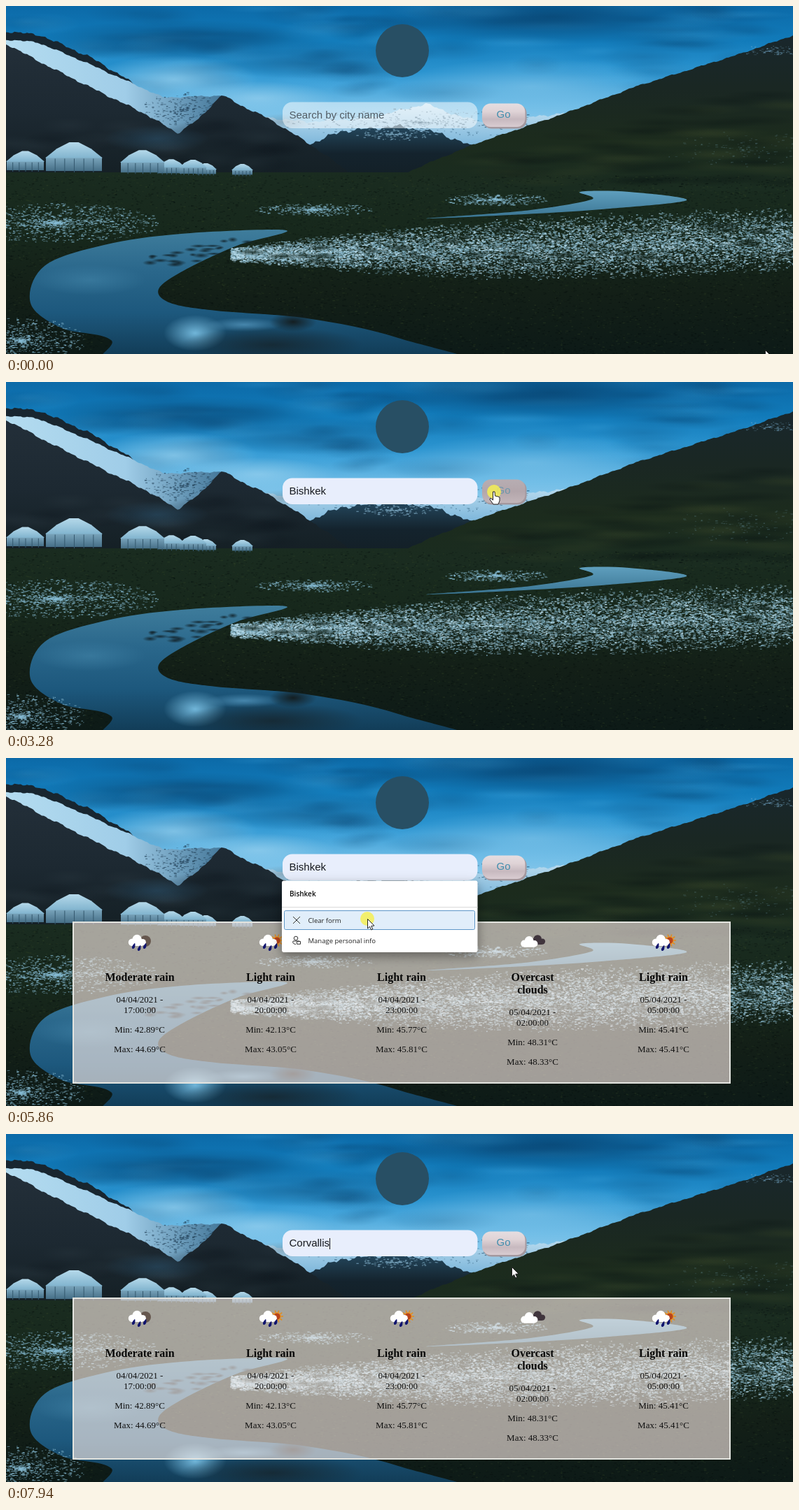
An HTML page with a canvas for the animation above (8 s loop, 1124 px wide and 498 px high).

```html
<!DOCTYPE html>
<html lang="en">
<head>
<meta charset="utf-8">
<title>City forecast</title>
<style>
  html, body { margin: 0; width: 100%; height: 100%; overflow: hidden; background: #0e1a18; }
  canvas { display: block; }
</style>
</head>
<body>
<canvas id="stage" width="1124" height="498"></canvas>
<script>
const W = 1124, H = 498, LOOP = 8000, STEP = 78;
const ctx = document.getElementById('stage').getContext('2d');
const SANS = '"Liberation Sans", Arial, sans-serif';
const SERIF = '"Liberation Serif", "Times New Roman", serif';
const MENU = '"Open Sans", "Noto Sans", sans-serif';

let seed = 7;
function rnd(a = 0, b = 1) {
  seed = (seed * 1664525 + 1013904223) >>> 0;
  return a + (b - a) * seed / 4294967296;
}
const pick = list => list[Math.floor(rnd(0, list.length))];

function gradient(g, y0, y1, ...stops) {
  const fill = g.createLinearGradient(0, y0, 0, y1);
  stops.forEach((c, i) => fill.addColorStop(i / (stops.length - 1), c));
  return fill;
}

function poly(g, pts, fill) {
  g.beginPath();
  pts.forEach(p => g.lineTo(...p));
  g.closePath();
  g.fillStyle = fill;
  g.fill();
}

// Closed smooth curve through every point.
function blob(g, pts, fill) {
  const at = i => pts[(i + pts.length) % pts.length];
  g.beginPath();
  g.moveTo(...pts[0]);
  pts.forEach((p, i) => {
    const a = at(i - 1), q = at(i + 1), b = at(i + 2);
    g.bezierCurveTo(p[0] + (q[0] - a[0]) / 6, p[1] + (q[1] - a[1]) / 6,
      q[0] - (b[0] - p[0]) / 6, q[1] - (b[1] - p[1]) / 6, ...q);
  });
  g.fillStyle = fill;
  g.fill();
}

// Land below a skyline of key points, roughened by sines.
function ridge(g, keys, base, rough, fill) {
  const line = [];
  for (let i = 1; i < keys.length; i++) {
    const [x0, y0] = keys[i - 1], [x1, y1] = keys[i];
    for (let x = x0; x < x1; x += 3) {
      const noise = Math.sin(x * .31) + Math.sin(x * .73 + 2) * .6 + Math.sin(x * .13 + 1);
      line.push([x, y0 + (y1 - y0) * (x - x0) / (x1 - x0) + rough * noise]);
    }
  }
  const end = keys[keys.length - 1];
  poly(g, [...line, end, [end[0], base], [keys[0][0], base]], fill);
}

// Soft elliptical glow; rgb is "r,g,b".
function glow(g, x, y, rx, ry, rgb, a) {
  g.save();
  g.translate(x, y);
  g.scale(rx, ry);
  const fill = g.createRadialGradient(0, 0, 0, 0, 0, 1);
  fill.addColorStop(0, `rgba(${rgb},${a})`);
  fill.addColorStop(1, `rgba(${rgb},0)`);
  g.fillStyle = fill;
  g.fillRect(-1, -1, 2, 2);
  g.restore();
}

// Short dashes at places given by a random rule.
function scatter(g, count, place, rgb, alpha) {
  for (let i = 0; i < count; i++) {
    const [x, y] = place();
    g.fillStyle = `rgba(${rgb},${alpha * rnd(.3, 1)})`;
    g.fillRect(x, y, rnd(1, 4), rnd(.8, 1.6));
  }
}
const around = (x, y, rx, ry) => () => {
  const a = rnd(0, 2 * Math.PI), r = rnd();
  return [x + rx * r * Math.cos(a), y + ry * r * Math.sin(a)];
};

function paintSky(g) {
  const dark = '8,62,104', light = '150,208,238';
  g.fillStyle = gradient(g, 0, 190, '#0c6aa8', '#117ab9', '#2b94d0', '#6cbbe6', '#a5d6f0');
  g.fillRect(0, 0, W, 260);
  for (let i = 0; i < 120; i++) {
    const y = rnd(0, 125);
    glow(g, rnd(0, W), y, rnd(30, 90), rnd(6, 18), pick([dark, '66,168,224']), .2);
  }
  glow(g, 250, 50, 210, 30, dark, .6);
  glow(g, 780, 15, 260, 40, dark, .7);
  glow(g, 430, 82, 150, 22, dark, .4);
  glow(g, 240, 105, 120, 34, light, .75);
  glow(g, 360, 132, 110, 24, light, .7);
  glow(g, 750, 115, 190, 40, light, .45);
}

function paintPeaks(g) {
  ridge(g, [[360, 158], [430, 166], [520, 160], [600, 140], [650, 159], [690, 167], [797, 153]], 212, 1,
    gradient(g, 140, 205, '#c6e3f3', '#76b2d8'));
  scatter(g, 420, around(590, 166, 200, 22), '40,84,112', .75);
  ridge(g, [[415, 205], [480, 179], [560, 172], [620, 182], [670, 203], [700, 250]], 250, 1.5,
    gradient(g, 172, 250, '#24475d', '#14232d', '#131f26'));
  scatter(g, 150, around(555, 183, 60, 9), '150,198,225', .7);

  ridge(g, [[0, 36], [50, 42], [120, 73], [172, 104], [230, 150]], 240, 1, '#182630');
  const snow = g.createLinearGradient(0, 0, 310, 0);
  snow.addColorStop(0, '#b4dcf0');
  snow.addColorStop(.55, '#a0cde8');
  snow.addColorStop(1, '#437698');
  ridge(g, [[0, 48], [45, 52], [110, 79], [172, 107], [225, 131], [312, 128]], 240, .6, snow);
  scatter(g, 260, around(250, 148, 55, 26), '30,58,80', .7);
  ridge(g, [[0, 54], [60, 86], [130, 121], [200, 155], [245, 182], [275, 162], [308, 127], [335, 142],
    [375, 161], [430, 195], [505, 248]], 250, .8, gradient(g, 55, 248, '#232f39', '#1d2932', '#141f24'));
  for (let i = 0; i < 30; i++) {
    const x = rnd(0, 400);
    glow(g, x, rnd(165, 230), 40, 12, pick(['12,20,27', '46,61,70']), .25);
  }
  glow(g, 215, 190, 75, 20, '50,100,135', .4);
}

function paintLand(g) {
  g.fillStyle = gradient(g, 237, H, '#1a2c20', '#17281c', '#131f17', '#0d1a17');
  g.fillRect(0, 238, W, H);
  ridge(g, [[545, 250], [610, 222], [673, 196], [797, 154], [900, 115], [1050, 68], [W, 42]], 265, .5,
    gradient(g, 45, 262, '#19272c', '#1a2723', '#1c2b1d', '#1a2c20'));
  for (let i = 0; i < 60; i++) {
    const x = rnd(680, W);
    glow(g, x, rnd(225 - (x - 673) * .27, 255), 60, 8, pick(['8,18,18', '48,62,38']), .3);
  }
  scatter(g, 70, around(1090, 64, 40, 9), '120,172,205', .6);
  scatter(g, 7000, () => [rnd(0, W), rnd(242, H)], '5,13,13', .45);
  scatter(g, 3500, () => [rnd(0, W), rnd(242, H)], '57,75,42', .35);

  blob(g, [[820, 266], [890, 266], [972, 278], [850, 291], [720, 299], [600, 304], [740, 293], [836, 277]],
    gradient(g, 264, 304, '#5f9fbe', '#3a7492'));
  blob(g, [[400, 321], [250, 326], [140, 342], [55, 372], [35, 425], [80, 461], [150, 478], [170, 530],
    [690, 530], [560, 475], [430, 447], [300, 436], [235, 425], [218, 405], [255, 378], [330, 343]],
    gradient(g, 320, 498, '#3f7d9c', '#2a678b', '#1d587d', '#123d58'));
  glow(g, 120, 392, 80, 22, '66,132,168', .6);
  glow(g, 270, 468, 45, 26, '128,200,236', .85);
  glow(g, 340, 456, 55, 10, '100,170,210', .6);
  glow(g, 380, 485, 130, 26, '22,40,50', .9);
  glow(g, 410, 452, 34, 14, '20,30,33', 1);
  for (let i = 0; i < 24; i++) {
    const x = rnd(180, 350);
    glow(g, x, 385 - (x - 150) * .22 + rnd(-14, 8), rnd(5, 14), rnd(2, 4), '18,36,44', .9);
  }
}

function paintSnow(g) {
  // The far bank: a band that widens to the right.
  const field = () => {
    const u = rnd(), top = 288 + 57 * (1 - u) ** 2, low = 366 + 14 * u + 20 * Math.sin(Math.PI * u);
    return [320 + 804 * u, top + (low - top) * (rnd() + rnd()) / 2];
  };
  scatter(g, 13000, field, '140,190,212', .75);
  scatter(g, 3500, field, '190,225,240', .9);
  for (let i = 0; i < 40; i++) {
    const [x, y] = field();
    glow(g, x, y, rnd(10, 30), rnd(3, 6), '20,36,28', .75);
  }
  const frost = '135,188,212';
  scatter(g, 1500, around(70, 310, 150, 28), frost, .8);
  scatter(g, 900, around(20, 478, 95, 32), frost, .8);
  scatter(g, 450, around(440, 291, 85, 9), frost, .8);
  scatter(g, 400, around(700, 277, 75, 9), frost, .8);
  scatter(g, 150, around(1050, 205, 120, 26), frost, .25);
}

function yurt(g, x, w) {
  const base = 235 + x * .02, h = w * .5, top = base - h, wall = base - h * .48;
  g.fillStyle = gradient(g, wall, base, '#7ba6bd', '#466f87');
  g.fillRect(x + 1, wall, w - 2, base - wall);
  g.fillStyle = '#34586e';
  for (let i = 1; i < 6; i++) g.fillRect(x + w * i / 6, wall + 2, 1, h * .48);
  poly(g, [[x, wall + 1], [x + w * .2, top + h * .22], [x + w * .42, top], [x + w * .58, top],
    [x + w * .8, top + h * .22], [x + w, wall + 1]], gradient(g, top, wall, '#b5d9ea', '#84b6d0'));
}

function paintScene() {
  const cv = document.createElement('canvas');
  cv.width = W;
  cv.height = H;
  const g = cv.getContext('2d');
  paintSky(g);
  paintPeaks(g);
  paintLand(g);
  paintSnow(g);
  [[0, 55], [56, 82], [216, 40], [270, 31], [247, 40], [163, 64], [322, 31]].forEach(y => yurt(g, ...y));
  g.fillStyle = '#284f64';
  g.beginPath();
  g.arc(566, 64, 38, 0, 7);
  g.fill();
  return cv;
}
const scene = paintScene();

function text(s, x, y, font, color, align = 'left') {
  ctx.font = font;
  ctx.fillStyle = color;
  ctx.textAlign = align;
  ctx.fillText(s, x, y);
}

function box(x, y, w, h, r, fill, stroke) {
  ctx.beginPath();
  ctx.roundRect(x, y, w, h, r);
  ctx.fillStyle = fill;
  ctx.fill();
  if (!stroke) return;
  ctx.strokeStyle = stroke;
  ctx.stroke();
}

function disc(x, y, r, fill) {
  ctx.beginPath();
  ctx.arc(x, y, r, 0, 7);
  ctx.fillStyle = fill;
  ctx.fill();
}

function cloud(x, y, s, fill) {
  disc(x - 9 * s, y + 2 * s, 6 * s, fill);
  disc(x - s, y - 3 * s, 7.5 * s, fill);
  disc(x + 8 * s, y + 2 * s, 5.5 * s, fill);
  box(x - 10 * s, y, 19 * s, 8 * s, 3 * s, fill);
}

function sun(x, y) {
  ctx.strokeStyle = '#dc8d25';
  ctx.lineWidth = 1.6;
  ctx.beginPath();
  for (let a = 0; a < 6.2; a += Math.PI / 5) {
    ctx.moveTo(x, y);
    ctx.lineTo(x + 9 * Math.cos(a), y + 9 * Math.sin(a));
  }
  ctx.stroke();
  ctx.lineWidth = 1;
  disc(x, y, 6, '#e9952a');
  disc(x, y, 4.6, '#b8441c');
}

function weatherIcon(x, kind) {
  if (kind === 'clouds') {
    cloud(x + 8, 261, .75, '#40353d');
    cloud(x - 4, 264, .85, '#fff');
    return;
  }
  if (kind === 'night') disc(x + 8, 262, 8, '#66574e');
  else sun(x + 9, 261);
  cloud(x - 3, 262, .88, '#fff');
  for (let i = -1; i <= 1; i++) {
    const dx = x - 1 + 8 * i, y = 272 - 3 * i * i;
    blob(ctx, [[dx + 2, y - 4], [dx + 2, y + 2], [dx - 1, y + 4], [dx - 2, y + 1]], '#10146e');
  }
}

const forecast = [
  ['night', 'Moderate rain', '04/04/2021 -', '17:00:00', '42.89', '44.69'],
  ['day', 'Light rain', '04/04/2021 -', '20:00:00', '42.13', '43.05'],
  ['day', 'Light rain', '04/04/2021 -', '23:00:00', '45.77', '45.81'],
  ['clouds', 'Overcast clouds', '05/04/2021 -', '02:00:00', '48.31', '48.33'],
  ['day', 'Light rain', '05/04/2021 -', '05:00:00', '45.41', '45.41']
];

function drawPanel(mode) {
  if (!mode) return;
  const [w, h] = mode === 'full' ? [938, 230] : [105, 32];
  ctx.lineWidth = 2;
  box(565 - w / 2, 235, w, h, 0, 'rgba(255,240,236,.61)', '#e3e4df');
  ctx.lineWidth = 1;
  if (mode !== 'full') return;
  forecast.forEach(([kind, title, date, time, min, max], i) => {
    const x = 191 + 187 * i;
    const lines = kind === 'clouds' ? title.split(' ') : [title];
    const dy = 18 * (lines.length - 1);
    const line = (s, y) => text(s, x, y + dy, '13px ' + SERIF, '#111', 'center');
    weatherIcon(x, kind);
    lines.forEach((s, k) => text(s, x, 319 + 18 * k, 'bold 16px ' + SERIF, '#080808', 'center'));
    line(date, 350);
    line(time, 365);
    line(`Min: ${min}°C`, 393);
    line(`Max: ${max}°C`, 421);
  });
}

const item = (label, y, h, type) => ({ label, y, h, type });
const manage = y => item('Manage personal info', y, 28, 'info');
const fullMenu = {
  bottom: 313, rule: 277,
  items: [...['Corvallis', 'Bishkek', 'Asian'].map((c, i) => item(c, 178.5 + 32 * i, 31, 'city')), manage(282)]
};
const shortMenu = {
  bottom: 278, rule: 213,
  items: [item('Bishkek', 178.5, 31, 'city'), item('Clear form', 218.5, 27, 'clear'), manage(247)]
};

const script = [
  [0, { value: '', panel: '', menu: null, down: false, focus: false }],
  [1350, { down: true, focus: true }],
  [1426, { down: false, menu: fullMenu }],
  [2410, { down: true }],
  [2570, { down: false, menu: null, value: 'Bishkek' }],
  [3280, { down: true, focus: false }],
  [3550, { down: false, panel: 'empty' }],
  [3750, { panel: 'full' }],
  [5150, { down: true, focus: true }],
  [5230, { down: false, menu: shortMenu }],
  [5780, { down: true }],
  [5940, { down: false, menu: null }],
  [6030, { value: '' }],
  [6400, { down: true }],
  [6480, { down: false, menu: fullMenu }],
  [7480, { down: true }],
  [7560, { down: false, menu: null, value: 'Corvallis' }]
];
const stateAt = t => Object.assign({}, ...script.filter(e => e[0] <= t).map(e => e[1]));

// first step, last step, place reached
const moves = [
  [70, 350, 642, 215], [500, 1270, 562, 166], [1580, 2180, 521, 215], [2410, 2410, 519, 218],
  [2650, 3200, 697, 157], [4360, 4520, 640, 212], [4670, 4910, 550, 161], [5390, 5780, 516, 230],
  [6030, 6250, 505, 163], [6500, 6640, 489, 199], [7090, 7090, 488, 213], [7250, 7250, 488, 200],
  [7560, 7940, 722, 190]
];

function pointerAt(t) {
  let x = 1084, y = 492;
  for (const [a, b, u, v] of moves) {
    if (t < a) break;
    const n = Math.round((b - a) / STEP);
    const k = n ? Math.min(1, (Math.floor((t - a) / (b - a) * n + 1e-6) + 1) / (n + 1)) : 1;
    x += (u - x) * k;
    y += (v - y) * k;
  }
  return { x, y };
}

function menuIcon(type, y) {
  ctx.strokeStyle = '#333';
  ctx.beginPath();
  if (type === 'clear') {
    ctx.moveTo(410, y - 5); ctx.lineTo(420, y + 5);
    ctx.moveTo(420, y - 5); ctx.lineTo(410, y + 5);
  } else {
    ctx.arc(414, y - 3, 2.8, 0, 7);
    ctx.moveTo(419, y + 1); ctx.lineTo(410, y + 1);
    ctx.quadraticCurveTo(408.5, y + 5, 414, y + 5.5);
    ctx.rect(415.5, y + 1.5, 5, 3.8);
  }
  ctx.stroke();
}

function drawMenu(menu, hover) {
  ctx.save();
  ctx.shadowColor = 'rgba(0,0,0,.4)';
  ctx.shadowBlur = 16;
  ctx.shadowOffsetY = 6;
  box(394, 175.5, 279.5, menu.bottom - 175.5, 3, '#fff');
  ctx.restore();
  ctx.fillStyle = '#d9d9d9';
  ctx.fillRect(394, menu.rule, 279.5, 1);
  for (const it of menu.items) {
    const mid = it.y + it.h / 2;
    if (it === hover) box(397.5, it.y, 272, it.h, 2, '#e1eefa', '#5e97c8');
    if (it.type === 'city') {
      text(it.label, 405, mid + 4, '600 10px ' + MENU, '#0c0c0c');
    } else {
      text(it.label, 431.5, mid + 4, '9.5px ' + MENU, '#222');
      menuIcon(it.type, mid);
    }
  }
}

function drawField({ value, focus }, hover) {
  const preview = hover && hover.type === 'city' && hover.label;
  box(395, 137.5, 278.5, 37.5, 14, preview || value ? '#e8eefc' : 'rgba(255,255,255,.5)');
  if (preview) text(preview, 405, 161, '11px ' + SANS, '#222');
  else text(value || 'Search by city name', 404.5, 161, '15px ' + SANS, value ? '#16191d' : '#525c64');
  if (!focus || (hover && hover.type === 'clear')) return;
  const end = value && !preview ? ctx.measureText(value).width : 0;
  ctx.fillStyle = '#111';
  ctx.fillRect(Math.round(404.5 + end), 149, 1, 16);
}

function drawButton(hot, down) {
  box(681.5, 141.5, 62, 34, 12, '#a4989e');
  const tones = !hot ? ['#e5dde0', '#dfd3d6', '#c7b9bf', '#d9ccd1']
    : down ? ['#b7adb2', '#b3a6ab', '#c2b5b9'] : ['#b8b0b6', '#c9bcc1', '#d5c8cb'];
  box(680, 139.5, 61.5, 33.5, 12, gradient(ctx, 140, 173, ...tones));
  text('Go', 710.5, 160, '15px ' + SANS, hot ? '#6d97aa' : '#428eae', 'center');
}

function drawPointer({ x, y }, kind, down) {
  if (down) disc(x, y, 10, 'rgba(244,239,84,.85)');
  ctx.save();
  ctx.translate(x, y);
  ctx.strokeStyle = '#222';
  ctx.lineJoin = 'round';
  if (kind === 'beam') {
    ctx.beginPath();
    [-6.5, 6.5].forEach(v => { ctx.moveTo(-3, v); ctx.lineTo(3, v); });
    ctx.moveTo(0, -6.5); ctx.lineTo(0, 6.5);
  } else if (kind === 'hand') {
    poly(ctx, [[-1.5, 0], [1, 0], [1.5, 6], [6, 7], [8, 8], [8, 13], [6, 18], [-1, 18], [-6, 11], [-5, 9], [-1.5, 12]], '#fff');
  } else {
    poly(ctx, [[.5, .5], [.5, 14], [3.5, 11.2], [5.7, 16], [7.8, 15], [5.7, 10.4], [10, 10]], '#fff');
  }
  ctx.stroke();
  ctx.restore();
}

function draw() {
  const t = performance.now() % LOOP;
  const p = pointerAt(t), state = stateAt(t), { menu, down } = state;
  const hover = menu && menu.items.find(it => p.y >= it.y && p.y < it.y + it.h + 1);
  const over = (x0, x1) => p.x >= x0 && p.x < x1 && p.y >= 138 && p.y < 175;
  const hot = over(680, 742);
  ctx.drawImage(scene, 0, 0);
  drawPanel(state.panel);
  drawField(state, hover);
  drawButton(hot, down);
  if (menu) drawMenu(menu, hover);
  drawPointer(p, hot ? 'hand' : over(395, 673) ? 'beam' : 'arrow', down);
  requestAnimationFrame(draw);
}
draw();
</script>
</body>
</html>
```
